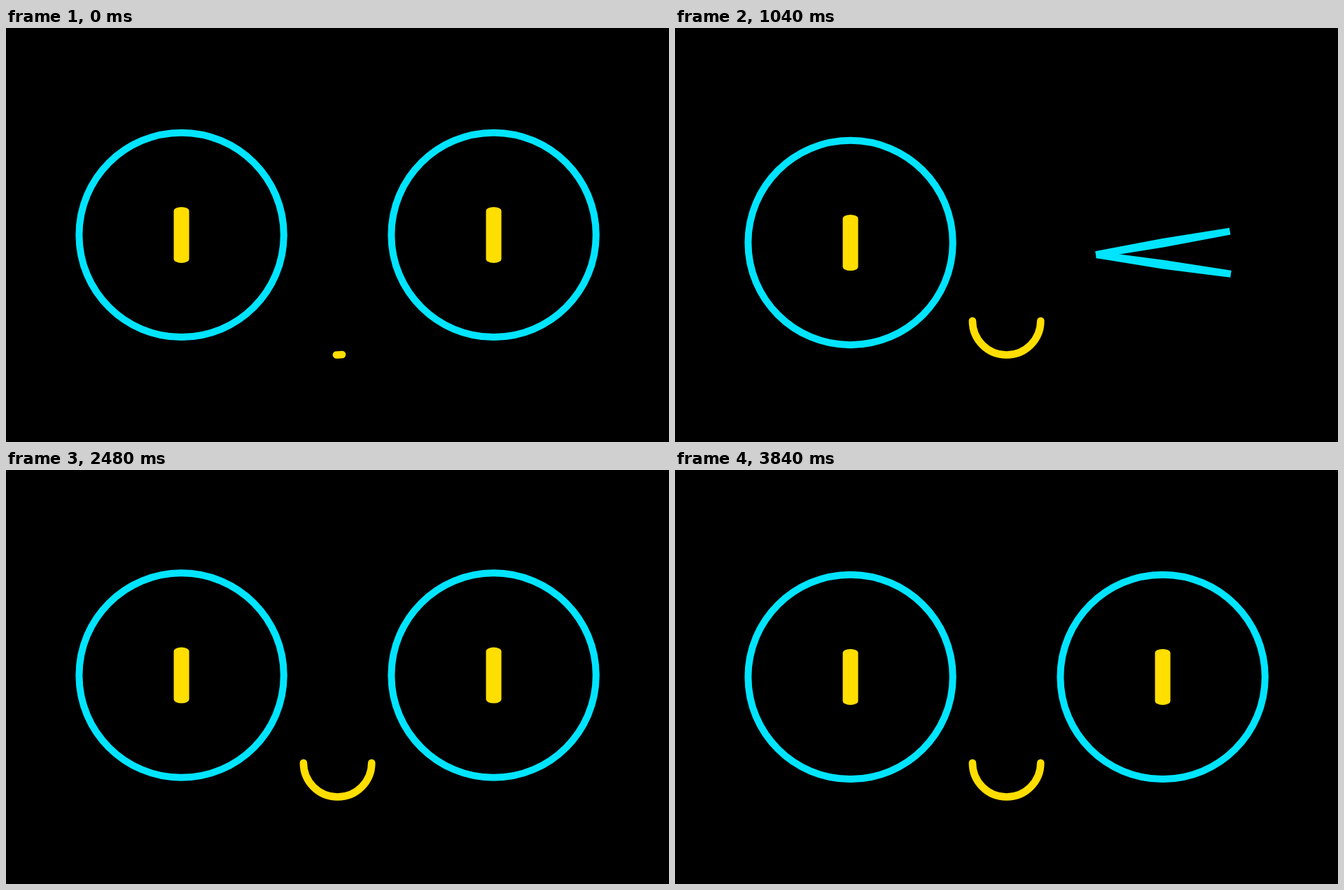
Write an HTML page with a canvas that moves like this. It is 947 px wide and 592 px high and loops after 5 s.

```html
<!DOCTYPE html>
<html lang="en">
<head>
<meta charset="utf-8">
<title>Winking face</title>
<style>
  html, body { margin: 0; width: 100%; height: 100%; overflow: hidden; background: #000; }
  canvas { display: block; width: 947px; height: 592px; }
</style>
</head>
<body>
<canvas id="stage" width="947" height="592"></canvas>
<script>
const ctx = document.getElementById('stage').getContext('2d');
const CYAN = '#00e4ff', YELLOW = '#ffde00';
const LOOP = 5000, STEP = 40;
const CLOSE = 280, OPEN = 2320, MOVE = 120;
const EYE_Y = 295.9, EYE_R = 146.2, DROP = 11.3;
const KAPPA = 0.5523;

const clamp = v => Math.max(0, Math.min(1, v));
const mix = (a, b, k) => a + (b - a) * k;

// Corners in the order left, top, right, bottom, relative to the eye centre
const ROUND = [[-1, 0], [0, -1], [1, 0], [0, 1]].map(p => p.map(v => v * EYE_R));
const LOWER = [[-94.5, 17.2], [0.5, 29.6], [97.3, 44.8], [0.5, 32.6]];
const UPPER = [[-95.5, 17.2], [0.5, -1], [96, -16.3], [0.5, 1.6]];

// Linear move that overshoots and rings out with a decaying sine
function spring(t, start) {
  const s = (t - start - MOVE) / 1000;
  if (s <= 0) return clamp((t - start) / MOVE);
  const speed = 1000 / MOVE;
  return 1 + speed * 0.05 * Math.sin(2 * Math.PI * 2.5 * s) * Math.exp(-4 * s);
}

// Closed four-corner outline, from the full circle (0) to a flat lid (1)
function outline(flat, k) {
  const pts = ROUND.map((p, i) => p.map((v, j) => mix(v, flat[i][j], k)));
  const h = EYE_R * KAPPA * (1 - k);
  const tangent = [[0, -h], [h, 0], [0, h], [-h, 0]];
  ctx.beginPath();
  ctx.moveTo(...pts[0]);
  for (let i = 0; i < 4; i++) {
    const n = (i + 1) % 4, [a, b] = [pts[i], pts[n]], [u, v] = [tangent[i], tangent[n]];
    ctx.bezierCurveTo(a[0] + u[0], a[1] + u[1], b[0] - v[0], b[1] - v[1], ...b);
  }
  ctx.closePath();
  ctx.stroke();
}

function pupil(open) {
  if (open <= 0) return;
  ctx.save();
  ctx.scale(1, open);
  ctx.beginPath();
  ctx.moveTo(-11, -34.5);
  ctx.ellipse(0, -34.5, 11, 5.5, 0, Math.PI, 2 * Math.PI);
  ctx.ellipse(0, 34.5, 11, 5.5, 0, 0, Math.PI);
  ctx.closePath();
  ctx.fill();
  ctx.restore();
}

function eye(x, y, shut) {
  ctx.save();
  ctx.translate(x, y);
  ctx.strokeStyle = CYAN;
  ctx.fillStyle = YELLOW;
  ctx.lineWidth = 10;
  ctx.lineCap = 'butt';
  ctx.lineJoin = 'bevel';
  outline(LOWER, shut);
  pupil(1 - shut);
  ctx.restore();
}

function mouth(k) {
  const mid = Math.PI / 2;
  ctx.strokeStyle = YELLOW;
  ctx.lineWidth = 10.6;
  ctx.lineCap = 'round';
  ctx.beginPath();
  ctx.arc(473.6, 418.8, 48.7, mix(mid - 0.133, 0, k), mix(mid + 0.035, Math.PI, k));
  ctx.stroke();
}

function draw(t) {
  ctx.fillStyle = '#000';
  ctx.fillRect(0, 0, 947, 592);
  const y = EYE_Y + DROP * (t < OPEN ? spring(t, CLOSE) : 1 - spring(t, OPEN));
  const shut = clamp((t - CLOSE) / MOVE) - clamp((t - OPEN) / MOVE);
  eye(250.6, y, 0);
  eye(696.6, y, shut);
  if (t >= CLOSE + MOVE && t < OPEN) {
    ctx.save();
    ctx.translate(696.6, y);
    ctx.strokeStyle = CYAN;
    ctx.lineWidth = 10;
    ctx.lineCap = 'butt';
    ctx.lineJoin = 'bevel';
    outline(UPPER, 1);
    ctx.restore();
  }
  mouth(clamp(t / 400));
}

const began = performance.now();
function tick() {
  const t = (performance.now() - began) % LOOP;
  draw(Math.floor(t / STEP) * STEP);
  requestAnimationFrame(tick);
}
tick();
</script>
</body>
</html>
```
